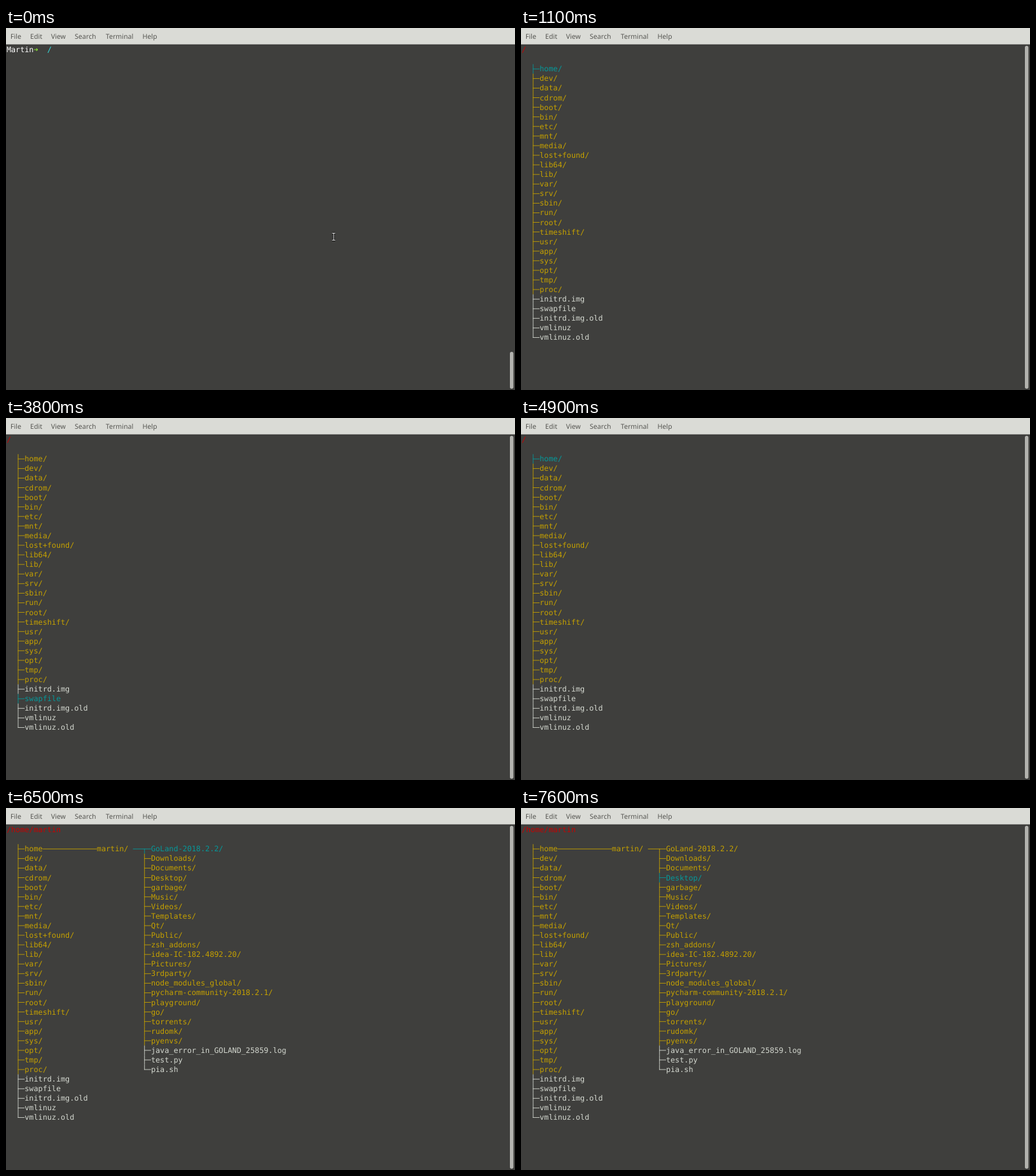
These frames come from a looping animation (800 px wide and 569 px high, 8 s). An HTML page with a canvas:

```html
<!DOCTYPE html>
<html lang="en">
<head>
<meta charset="utf-8">
<title>Directory tree in a terminal</title>
<style>
  html, body { margin: 0; width: 100%; height: 100%; overflow: hidden; background: #3f3f3d; }
  canvas { display: block; }
</style>
</head>
<body>
<canvas id="stage" width="800" height="569"></canvas>
<script>
const ctx = document.getElementById('stage').getContext('2d');
const LOOP = 8000;
const SCALE = 800 / 902;           // the terminal is laid out on a 902 px wide window
const CELL_W = 8, CELL_H = 17, LEFT = 1, TOP = 30;
const MONO = '13.29px "DejaVu Sans Mono", monospace';
const COLOR = {
  back: '#3f3f3d', bar: '#dadbd6', menu: '#565652', thumb: '#b3b3af',
  path: '#c80000', dir: '#c4a000', file: '#d3d7cf', active: '#06989a',
  prompt: '#ffffff', arrow: '#8ae234', cwd: '#34e2e2'
};

const USER = 'martin';
const COMMAND = 'ptree';
const KEY_TIMES = [100, 300, 500, 600, 700];
const MENU = [['File', 7], ['Edit', 38], ['View', 70.7], ['Search', 108], ['Terminal', 156.8], ['Help', 214.4]];

const ROOT = ('home/ dev/ data/ cdrom/ boot/ bin/ etc/ mnt/ media/ lost+found/ lib64/ lib/ var/ srv/ ' +
  'sbin/ run/ root/ timeshift/ usr/ app/ sys/ opt/ tmp/ proc/ ' +
  'initrd.img swapfile initrd.img.old vmlinuz vmlinuz.old').split(' ');
const HOME = ('GoLand-2018.2.2/ Downloads/ Documents/ Desktop/ garbage/ Music/ Videos/ Templates/ Qt/ ' +
  'Public/ zsh_addons/ idea-IC-182.4892.20/ Pictures/ 3rdparty/ node_modules_global/ ' +
  'pycharm-community-2018.2.1/ playground/ go/ torrents/ rudomk/ pyenvs/ ' +
  'java_error_in_GOLAND_25859.log test.py pia.sh').split(' ');

// time, tree depth, selected row
const STEPS = [
  [1100, 0, 0], [2700, 0, 14], [3100, 0, 18], [3200, 0, 21], [3700, 0, 23], [3800, 0, 25],
  [4900, 0, 0], [5700, 1, 0], [6500, 2, 0], [7100, 2, 1], [7400, 2, 2], [7600, 2, 3]
];

const colX = col => LEFT + col * CELL_W;
const rowY = row => TOP + row * CELL_H;

function write(text, col, row, color) {
  ctx.font = MONO;
  ctx.fillStyle = color;
  ctx.fillText(text, colX(col), rowY(row) + 13);
}

function rule(x1, x2, row, color) {
  ctx.fillStyle = color;
  ctx.fillRect(x1, rowY(row) + 8, x2 - x1, 1);
}

function drawBranch(names, col, selected, opensFromLeft) {
  const x = colX(col) + 4;
  names.forEach((name, i) => {
    const row = i + 2;
    const color = i === selected ? COLOR.active : name.endsWith('/') ? COLOR.dir : COLOR.file;
    const start = opensFromLeft && i === 0 ? 8 : 0;
    const end = i === names.length - 1 ? 9 : CELL_H;
    ctx.fillStyle = color;
    ctx.fillRect(x, rowY(row) + start, 1, end - start);
    rule(start ? colX(col - 2) : x, colX(col + 2), row, color);
    write(name, col + 2, row, color);
  });
}

function drawTree([, depth, selected]) {
  write(['/', '/home', '/home/' + USER][depth], 0, 0, COLOR.path);
  // an opened directory loses its trailing slash
  drawBranch(ROOT, 2, depth ? -1 : selected);
  if (depth) {
    const color = depth === 1 ? COLOR.active : COLOR.dir;
    ctx.fillStyle = COLOR.back;
    ctx.fillRect(colX(8), rowY(2), CELL_W, CELL_H);
    rule(colX(8), colX(20), 2, color);
    write(USER + '/', 20, 2, color);
  }
  if (depth === 2) drawBranch(HOME, 30, selected, true);
}

function drawPrompt(t) {
  write('Martin', 0, 0, COLOR.prompt);
  write('➜', 6, 0, COLOR.arrow);
  write('/', 9, 0, COLOR.cwd);
  write(COMMAND.slice(0, KEY_TIMES.filter(k => k <= t).length), 11, 0, COLOR.prompt);
}

function drawBeam(x, y) {
  for (const [color, width] of [['#111', 3], ['#eee', 1]]) {
    ctx.strokeStyle = color;
    ctx.lineWidth = width;
    ctx.beginPath();
    ctx.moveTo(x - 2.5, y - 5.5); ctx.lineTo(x + 2.5, y - 5.5);
    ctx.moveTo(x, y - 5.5); ctx.lineTo(x, y + 5.5);
    ctx.moveTo(x - 2.5, y + 5.5); ctx.lineTo(x + 2.5, y + 5.5);
    ctx.stroke();
  }
}

function drawWindow(thumbTop) {
  ctx.fillStyle = COLOR.back;
  ctx.fillRect(0, 0, 800, 569);
  ctx.fillStyle = COLOR.bar;
  ctx.fillRect(0, 0, 800, 25.7);
  ctx.fillStyle = COLOR.menu;
  ctx.font = '10.6px "Noto Sans", sans-serif';
  for (const [label, x] of MENU) ctx.fillText(label, x, 17);
  ctx.fillStyle = COLOR.thumb;
  ctx.beginPath();
  ctx.roundRect(792, thumbTop, 5.5, 567 - thumbTop, 2.75);
  ctx.fill();
}

function draw(t) {
  const step = STEPS.filter(([time]) => time <= t).pop();
  ctx.textRendering = 'geometricPrecision';
  drawWindow(step ? 28 : 509);
  if (t < KEY_TIMES[0]) drawBeam(515, 328);
  ctx.save();
  ctx.scale(SCALE, SCALE);
  if (step) drawTree(step); else drawPrompt(t);
  ctx.restore();
}

const startTime = performance.now();
function tick() {
  draw((performance.now() - startTime) % LOOP);
  requestAnimationFrame(tick);
}
tick();
</script>
</body>
</html>
```
